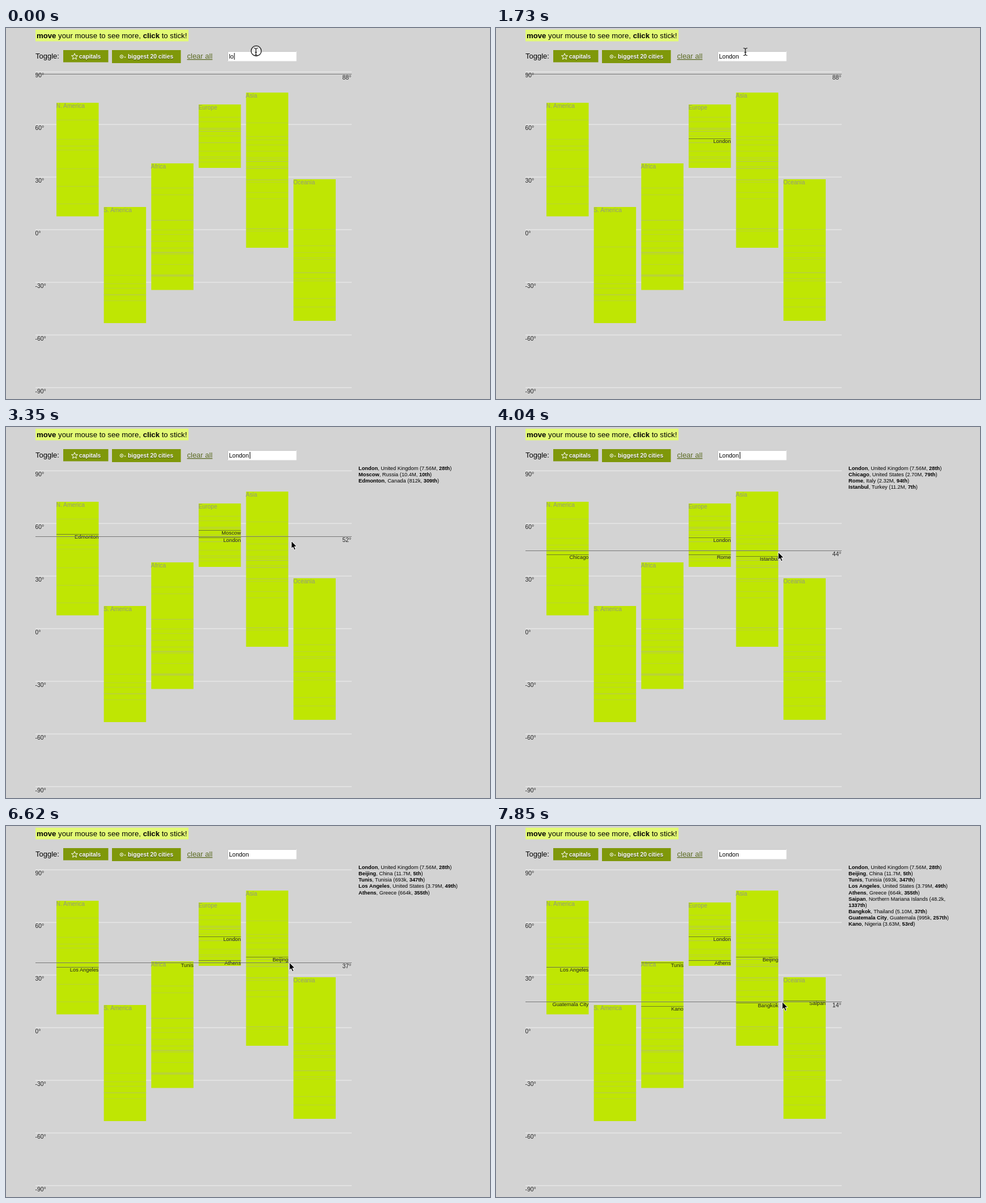
Write an HTML page that moves like this. It is 854 px wide and 655 px high and loops after 8000 ms.

```html
<!DOCTYPE html>
<html lang="en">
<head>
<meta charset="utf-8">
<title>Latitudes</title>
<style>
html, body { margin: 0; width: 100%; height: 100%; overflow: hidden; background: #d3d3d3; }
body, svg { font-family: "Liberation Sans", Helvetica, Arial, sans-serif; }
svg { position: absolute; left: 0; top: 0; }
text { white-space: pre; }
.head { font-size: 13.2px; }
.tool { font-size: 13px; }
.btn { font: bold 10.3px "Liberation Sans", Arial, sans-serif; fill: #fff; text-shadow: 0 1px 1px #3c4a00; }
.axis { font-size: 10.3px; fill: #222; }
.bar { font-size: 10.3px; fill: #949a80; }
.city { font-size: 9.3px; fill: #222; }
.field { font-size: 10.5px; }
.end { text-anchor: end; }
#list { position: absolute; left: 622px; top: 68px; width: 180px; font-size: 9.3px; line-height: 11.15px; }
</style>
</head>
<body>
<svg width="854" height="655">
  <rect x="52" y="3" width="270" height="20.5" fill="#e3fa75"/>
  <text class="head" x="54" y="18.3"><tspan font-weight="bold">move</tspan> your mouse to see more, <tspan font-weight="bold">click</tspan> to stick!</text>
  <text class="tool" x="52" y="54">Toggle:</text>
  <rect x="101" y="39" width="79.5" height="21.5" fill="#7f980a"/>
  <rect x="187" y="39" width="121.5" height="23" fill="#7f980a"/>
  <path d="M121 44.8l1.5 3.8 4 .2-3.1 2.6 1 3.9-3.4-2.2-3.4 2.2 1-3.9-3.1-2.6 4-.2z" fill="none" stroke="#fff"/>
  <text class="btn" x="129" y="54">capitals</text>
  <circle cx="204" cy="50.5" r="2.8" fill="none" stroke="#fff"/>
  <circle cx="204" cy="50.5" r="1" fill="#fff"/>
  <circle cx="210" cy="51.5" r="1" fill="#fff"/>
  <text class="btn" x="215" y="54">biggest 20 cities</text>
  <text class="tool" x="319.5" y="54" fill="#5c6b24" text-decoration="underline">clear all</text>
  <rect x="391" y="41" width="121.5" height="17.5" fill="#fff"/>
  <path d="M391.5 58V41.5H512" fill="none" stroke="#c6c6c6"/>
  <g id="chart"></g>
  <g id="live"></g>
</svg>
<div id="list"></div>
<svg width="854" height="655"><g id="pointer"></g></svg>
<script>
const LOOP = 8000, STEP = 90, CLICK = 6440;
const DEG = 3.0972, EQUATOR = 355.8, REACH = 3.4, BAR_W = 74.5;
const $ = id => document.getElementById(id);
const rect = (x, y, w, h, fill, alpha = 1) =>
  `<rect x="${x}" y="${y}" width="${w}" height="${h}" fill="${fill}" opacity="${alpha}"/>`;
const text = (cls, x, y, s) => `<text class="${cls}" x="${x}" y="${y}">${s}</text>`;
const barX = i => 89 + i * 83.65;
const latAt = y => (EQUATOR - y) / DEG;

// name, top, bottom, number of faint lines
const bars = [
  ['N. America', 132, 332.5, 7], ['S. America', 316, 521, 7], ['Africa', 239, 462.5, 17],
  ['Europe', 135, 247, 14], ['Asia', 114, 388, 20], ['Oceania', 267, 517, 11]
];

// name, bar, latitude, country, population, rank
const cities = [
  ['London', 3, 51.5, 'United Kingdom', '7.56M', '28th'],
  ['Helsinki', 3, 60.2, 'Finland', '588k', '409th'],
  ['Moscow', 3, 55.8, 'Russia', '10.4M', '10th'],
  ['Edmonton', 0, 53.5, 'Canada', '812k', '309th'],
  ['Chicago', 0, 41.85, 'United States', '2.70M', '79th'],
  ['Rome', 3, 41.9, 'Italy', '2.32M', '94th'],
  ['Istanbul', 4, 41, 'Turkey', '11.2M', '7th'],
  ['New York', 0, 40.7, 'United States', '8.18M', '20th'],
  ['Madrid', 3, 40.4, 'Spain', '3.26M', '62nd'],
  ['Beijing', 4, 39.9, 'China', '11.7M', '5th'],
  ['Tunis', 2, 36.85, 'Tunisia', '693k', '347th'],
  ['Los Angeles', 0, 34.05, 'United States', '3.79M', '49th'],
  ['Athens', 3, 38, 'Greece', '664k', '355th'],
  ['Cairo', 2, 30.05, 'Egypt', '7.73M', '26th'],
  ['Delhi', 4, 28.65, 'India', '10.9M', '9th'],
  ['Mexico City', 0, 19.4, 'Mexico', '12.3M', '4th'],
  ['Saipan', 5, 15.2, 'Northern Mariana Islands', '48.2k', '1337th'],
  ['Bangkok', 4, 13.75, 'Thailand', '5.10M', '37th'],
  ['Guatemala City', 0, 14.6, 'Guatemala', '995k', '257th'],
  ['Kano', 2, 12, 'Nigeria', '3.63M', '53rd']
].map(([name, bar, lat, country, people, rank]) => ({ name, bar, lat, country, people, rank }));

// pointer path: time, x, y
const path = [
  [0, 441, 42], [1710, 440, 42], [2430, 515, 116.3], [2520, 521, 129], [3350, 503, 203],
  [3960, 498, 221], [4860, 499, 229], [5220, 500, 238], [5580, 500, 241],
  [6900, 500, 241], [7740, 505, 310.4], [LOOP, 505, 310.4]
];

function pointAt(t) {
  const i = Math.max(1, path.findIndex(p => p[0] >= t));
  const [a, b] = [path[i - 1], path[i]], k = (t - a[0]) / (b[0] - a[0]);
  return [a[1] + (b[1] - a[1]) * k, a[2] + (b[2] - a[2]) * k];
}

// each bar shows the city just passed or, failing that, the next one in reach
function picked(lat) {
  return bars.flatMap((_, bar) => {
    const near = cities.filter(c => c.bar === bar && Math.abs(c.lat - lat) < REACH)
      .sort((a, b) => b.lat - a.lat);
    const passed = near.filter(c => c.lat >= lat);
    return passed.slice(-1)[0] || near[0] || [];
  });
}

let seed = 7;
const random = () => (seed = seed * 16807 % 2147483647) / 2147483647;

function drawChart() {
  let s = '';
  for (let lat = 90; lat >= -90; lat -= 30) {
    const y = EQUATOR - lat * DEG;
    s += rect(52, y - .5, 558, 1.6, '#e5e5e5') + text('axis', 51.5, y + 10.2, lat + '°');
  }
  bars.forEach(([name, top, bottom, count], i) => {
    s += rect(barX(i), top, BAR_W, bottom - top, '#bfe603');
    while (count--) {
      const y = Math.round(top + (bottom - top) * (.15 + .8 * random()));
      s += rect(barX(i), y, BAR_W, 1, '#aaa', .3);
    }
    s += text('bar', barX(i) - .5, top + 9.2, name);
  });
  $('chart').innerHTML = s;
}

function cityMark({ name, bar, lat }) {
  const x = barX(bar), y = Math.floor(355.3 - lat * DEG);
  return rect(x, y, BAR_W, 1, '#6f7f2a') + text('city end', x + BAR_W, y + 8, name);
}

const cityRow = c =>
  `<div><b>${c.name}</b>, ${c.country} (${c.people}, <b>${c.rank}</b>)</div>`;

function popup(t) {
  const alpha = Math.min(1, (t - 20) / 300, (1470 - t) / 170);
  if (t < 90 || alpha <= 0) return '';
  const lit = t >= 860;
  return `<g opacity="${alpha}" style="filter:drop-shadow(0 5px 6px #0006)">` +
    rect(391, 60, 121, 44, '#fff') + (lit ? rect(391, 62, 121, 19, '#3875d7') : '') +
    `<g fill="${lit ? '#fff' : '#000'}">${text('field', 394, 75, 'London')}</g>` +
    text('field', 394, 95, 'Londrina') + '</g>';
}

const ring = (x, y) =>
  `<circle cx="${x}" cy="${y}" r="9" fill="#fff" fill-opacity=".6" stroke="#222" stroke-width="1.4"/>`;
const beam = '<path d="M-3.5-6.5Q0-6.5 0-4Q0-6.5 3.5-6.5M0-4V4M-2 1H2M-3.5 6.5Q0 6.5 0 4Q0 6.5 3.5 6.5" fill="none" stroke="#111" stroke-width="1.2"/>';
const arrow = '<path d="M0 0V13.5L3 10.8 5.3 16 7.7 15 5.5 9.9H9.8Z" stroke="#fff"/>';

function drawPointer(t, x, y) {
  const halo = t < STEP ? ring(441.5, 40.5) : t >= CLICK && t < CLICK + 180 ? ring(501.5, 240) : '';
  $('pointer').innerHTML = halo +
    `<g transform="translate(${x} ${y})">${y < 62 ? beam : arrow}</g>`;
}

function draw(now) {
  const t = now % LOOP, tick = t - t % STEP;
  const [x, y] = pointAt(tick);
  // the latitude line trails the pointer by one step
  const lineY = Math.max(81, pointAt(Math.max(0, tick - STEP))[1]);
  const shown = new Set(picked(latAt(lineY)));
  if (t >= 1385) shown.add(cities[0]);
  if (t >= CLICK) picked(latAt(pointAt(CLICK)[1])).forEach(c => shown.add(c));
  const rows = cities.filter(c => shown.has(c));
  const [typed, caret] = t < 90 ? ['lo', 402.5] : t < 940 ? ['lon', 408.5] : ['London', 430];

  let s = rows.map(cityMark).join('');
  s += rect(52, Math.round(lineY), 558, 1, '#777');
  s += text('axis end', 609, lineY + 9.5, Math.floor(latAt(lineY)) + '°');
  s += text('field', 393.5, 54, typed);
  if (t < 1300 || t >= 1820 && t < 6080) s += rect(caret, 44, 1, 12, '#000');
  $('live').innerHTML = s + popup(t);
  $('list').innerHTML = t < 1820 ? '' : rows.map(cityRow).join('');
  drawPointer(t, x, y);
  requestAnimationFrame(draw);
}

drawChart();
draw(performance.now());
</script>
</body>
</html>
```
